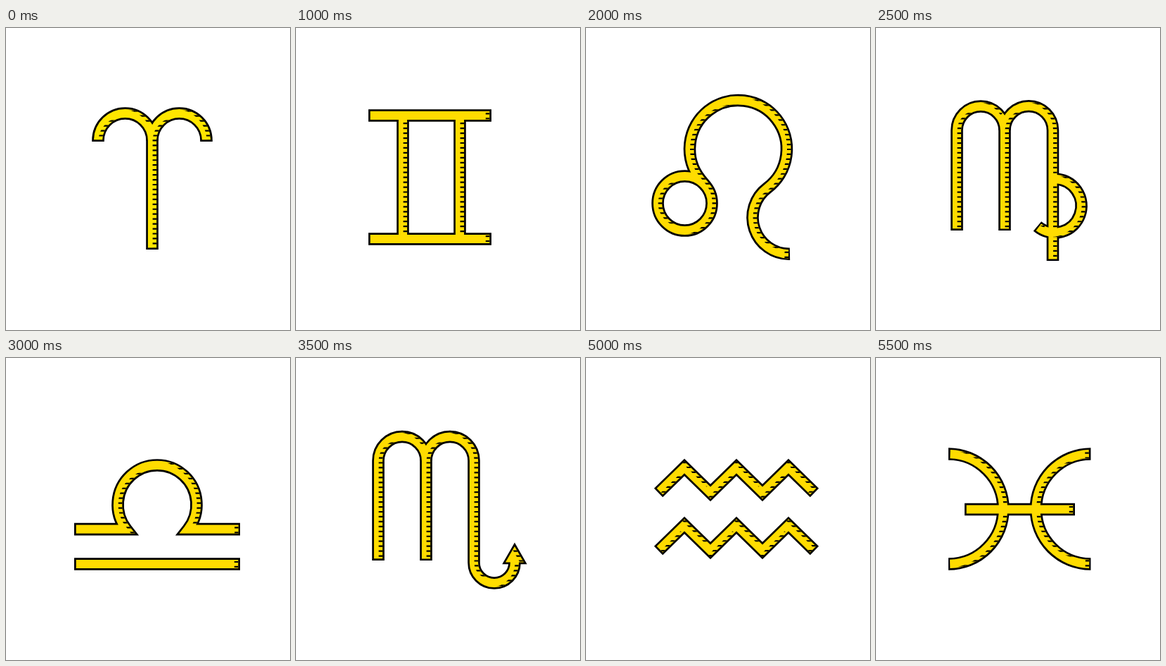
These frames come from a looping animation (404x428 px, 6000 ms). An HTML page with a canvas:

```html
<!DOCTYPE html>
<html lang="en">
<head>
<meta charset="utf-8">
<title>Zodiac rulers</title>
<style>
  html, body { margin: 0; height: 100%; overflow: hidden; background: #fff; }
  canvas { display: block; }
</style>
</head>
<body>
<canvas id="stage" width="404" height="428"></canvas>
<script>
const W = 404, H = 428, HOLD = 500;
const OUTER = 17.6, LINE = 2.7, TICK = 5.5, STEP = 6.95;

const ring = (x, y, r) =>
  `M${x - r} ${y}a${r} ${r} 0 1 1 ${2 * r} 0a${r} ${r} 0 1 1 ${-2 * r} 0Z`;

const zigzag = y =>
  'M103 ' + y + [1, 2, 3, 4, 5, 6].map(i => `L${103 + 37 * i} ${y - (i % 2) * 36}`).join('');

// row: height of one tick; bands: centre lines; tip: filled polygon
const signs = [
  { name: 'Aries', row: 152.5, color: '#ffe600', bands: [
    'M131 161V159.5A38.5 38.5 0 0 1 208 159.5V314',
    'M285 161V159.5A38.5 38.5 0 0 0 208 159.5'] },
  { name: 'Taurus', row: 121, color: '#ffe100', bands: [
    'M133 108V109A69 69 0 0 0 271 109V108', ring(202, 245, 67)] },
  { name: 'Gemini', row: 121.3, bands: [
    'M103 124H278', 'M103 299H278', 'M152 124V299', 'M233 124V299'] },
  { name: 'Cancer', row: 121, bands: [
    ring(149, 180, 38), ring(260, 248, 38),
    'M113 168A109.5 109.5 0 0 1 290 165', 'M296 260A109.5 109.5 0 0 1 119 263'] },
  { name: 'Leo', row: 102.5, bands: [
    ring(140.5, 248.5, 38.5),
    'M170.5 224.3L162.8 214.8A69 69 0 1 1 258.1 226.5A52 52 0 0 0 290 320.3'] },
  { name: 'Virgo', row: 309, bands: [
    'M115 287V145A34 34 0 0 1 183 145V287',
    'M183 145A34 34 0 0 1 251.5 145V330',
    'M254 214A38 38 0 1 1 229.5 281'] },
  { name: 'Libra', row: 289, bands: [
    'M97 242.6H171A56 56 0 1 1 259 242.6H333', 'M97 292H333'] },
  { name: 'Scorpio', row: 148.5, bands: [
    'M117 287V145.5A34 34 0 0 1 185 145.5V287',
    'M185 145.5A34 34 0 0 1 253 145.5V290A29 29 0 0 0 311 290V284'],
    tip: 'M311 267L298 289.5H324Z' },
  { name: 'Sagittarius', row: 126, bands: [
    'M115 303L289 129', 'M210 129H289V208', 'M130 218L200 288'] },
  { name: 'Capricorn', row: 122, bands: [
    'M147 121H289.3', 'M282.5 124L208.5 190', 'M147 192H215', ring(227.3, 249.5, 58)] },
  { name: 'Aquarius', row: 155, bands: [zigzag(191), zigzag(273)] },
  { name: 'Pisces', row: 211, bands: [
    'M103 136A78 78 0 0 1 103 292', 'M305.5 136A78 78 0 0 0 305.5 292',
    'M126 214.5H283'] }
];

function layer() {
  const canvas = document.createElement('canvas');
  canvas.width = W;
  canvas.height = H;
  return canvas.getContext('2d');
}

function pathLength(d) {
  const path = document.createElementNS('http://www.w3.org/2000/svg', 'path');
  path.setAttribute('d', d);
  return path.getTotalLength();
}

function drawOutline(c, sign) {
  c.strokeStyle = c.fillStyle = '#000';
  c.lineWidth = OUTER;
  for (const d of sign.bands) c.stroke(new Path2D(d));
  if (sign.tip) {
    c.lineWidth = 2 * LINE;
    c.stroke(new Path2D(sign.tip));
  }
}

// Open bands stop short of their ends so the outline closes them.
function drawInside(c, sign, color) {
  c.strokeStyle = c.fillStyle = color;
  c.lineWidth = OUTER - 2 * LINE;
  for (const d of sign.bands) {
    c.setLineDash(d.endsWith('Z') ? [] : [0, LINE, pathLength(d) - 2 * LINE, 99]);
    c.stroke(new Path2D(d));
  }
  c.setLineDash([]);
  if (sign.tip) c.fill(new Path2D(sign.tip));
}

// Ticks are horizontal stripes kept only along right-hand edges.
function drawTicks(sign) {
  const c = layer();
  drawInside(c, sign, '#000');
  c.globalCompositeOperation = 'destination-out';
  c.translate(-TICK, 0);
  drawInside(c, sign, '#000');
  c.translate(TICK, 0);
  c.globalCompositeOperation = 'destination-in';
  c.beginPath();
  for (let y = sign.row % STEP; y < H; y += STEP) c.rect(0, y - 1.1, W, 2.2);
  c.fill();
  return c.canvas;
}

const pictures = signs.map(sign => {
  const c = layer();
  c.fillStyle = '#fff';
  c.fillRect(0, 0, W, H);
  drawOutline(c, sign);
  drawInside(c, sign, sign.color || '#ffdc00');
  c.drawImage(drawTicks(sign), 0, 0);
  return c.canvas;
});

const stage = document.getElementById('stage').getContext('2d');
let start;
function frame(now) {
  start ??= now;
  stage.drawImage(pictures[Math.floor((now - start) / HOLD) % pictures.length], 0, 0);
  requestAnimationFrame(frame);
}
stage.drawImage(pictures[0], 0, 0);
requestAnimationFrame(frame);
</script>
</body>
</html>
```
